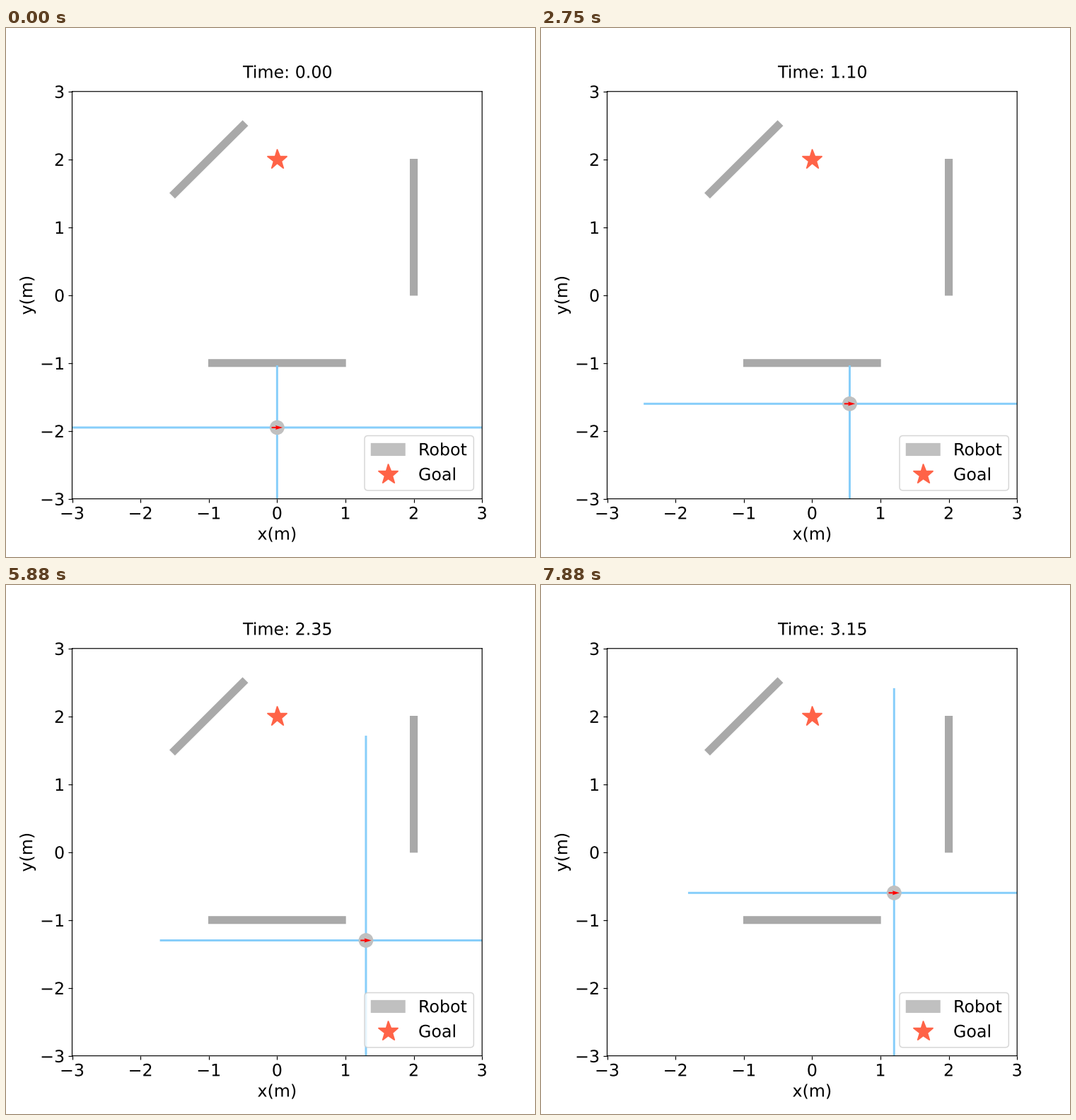
A matplotlib script for the animation above (8000 ms loop, 748 by 748 pixels).

```python
import matplotlib.pyplot as plt
from matplotlib.animation import FuncAnimation
from matplotlib.patches import Circle, Rectangle
from matplotlib.patheffects import Normal

STEP = 0.05          # metres per move and seconds per frame
REACH = 3.0          # sensor range
START = (0.0, -1.95)
MOVES = ("UUURLUUUURLRRR" + "R" * 18 + "URRUR"
         + "URLRU" * 2 + "U" * 10 + "LUULUU")
HEADING = {"U": (0, 1), "D": (0, -1), "L": (-1, 0), "R": (1, 0)}
WALLS = [(-1, -1.05, 2, 0.1), (1.95, 0, 0.1, 2)]   # x, y, width, height
FONT = 16

# Place lines, markers and glyph outlines at sub-pixel positions.
plt.rcParams.update({"path.snap": False, "path.effects": [Normal()],
                     "text.hinting": "none"})


def walk():
    x, y = START
    path = [START]
    for move in MOVES:
        dx, dy = HEADING[move]
        x, y = round(x + dx * STEP, 2), round(y + dy * STEP, 2)
        path.append((x, y))
    return path


def span(pos, cross, walls):
    """Free interval around pos along one axis, cut by the walls."""
    low, high = pos - REACH, pos + REACH
    for start, size, side, depth in walls:
        if side <= cross <= side + depth:
            if start >= pos:
                high = min(high, start)
            elif start + size <= pos:
                low = max(low, start + size)
    return low, high


PATH = walk()
ROWS = [(x, w, y, h) for x, y, w, h in WALLS]
COLS = [(y, h, x, w) for x, y, w, h in WALLS]

fig, ax = plt.subplots(figsize=(7, 7), dpi=748 / 7)
fig.subplots_adjust(left=0.125, right=0.9, bottom=0.11, top=0.88)
ax.set(xlim=(-3, 3), ylim=(-3, 3), xticks=range(-3, 4), yticks=range(-3, 4))
ax.set_xlabel("x(m)", fontsize=FONT)
ax.set_ylabel("y(m)", fontsize=FONT)
ax.tick_params(labelsize=FONT)

for x, y, w, h in WALLS:
    ax.add_patch(Rectangle((x, y), w, h, color="darkgrey"))
ax.add_patch(Rectangle((-1.75, 1.95), 1.5, 0.1, angle=45,
                       rotation_point="center", color="darkgrey"))

robot = ax.add_patch(Circle(START, 0.1, color="silver", zorder=3, label="Robot"))
ax.plot(0, 2, "*", color="tomato", markersize=20, label="Goal")
row, = ax.plot([], [], color="lightskyblue", lw=2)
col, = ax.plot([], [], color="lightskyblue", lw=2)
arrow = ax.quiver(*START, 0.16, 0, color="red", pivot="mid", width=0.0035,
                  angles="xy", scale_units="xy", scale=1, zorder=4)
clock = ax.text(-0.5, 3.2, "", fontsize=FONT)
ax.legend(loc="lower right", fontsize=FONT)


def update(i):
    x, y = PATH[i]
    row.set_data(span(x, y, ROWS), (y, y))
    col.set_data((x, x), span(y, x, COLS))
    robot.center = x, y
    arrow.set_offsets([(x, y)])
    clock.set_text(f"Time: {i * STEP:.2f}")
    return row, col, robot, arrow, clock


anim = FuncAnimation(fig, update, frames=len(PATH), interval=125, repeat=True)
plt.show()
```
